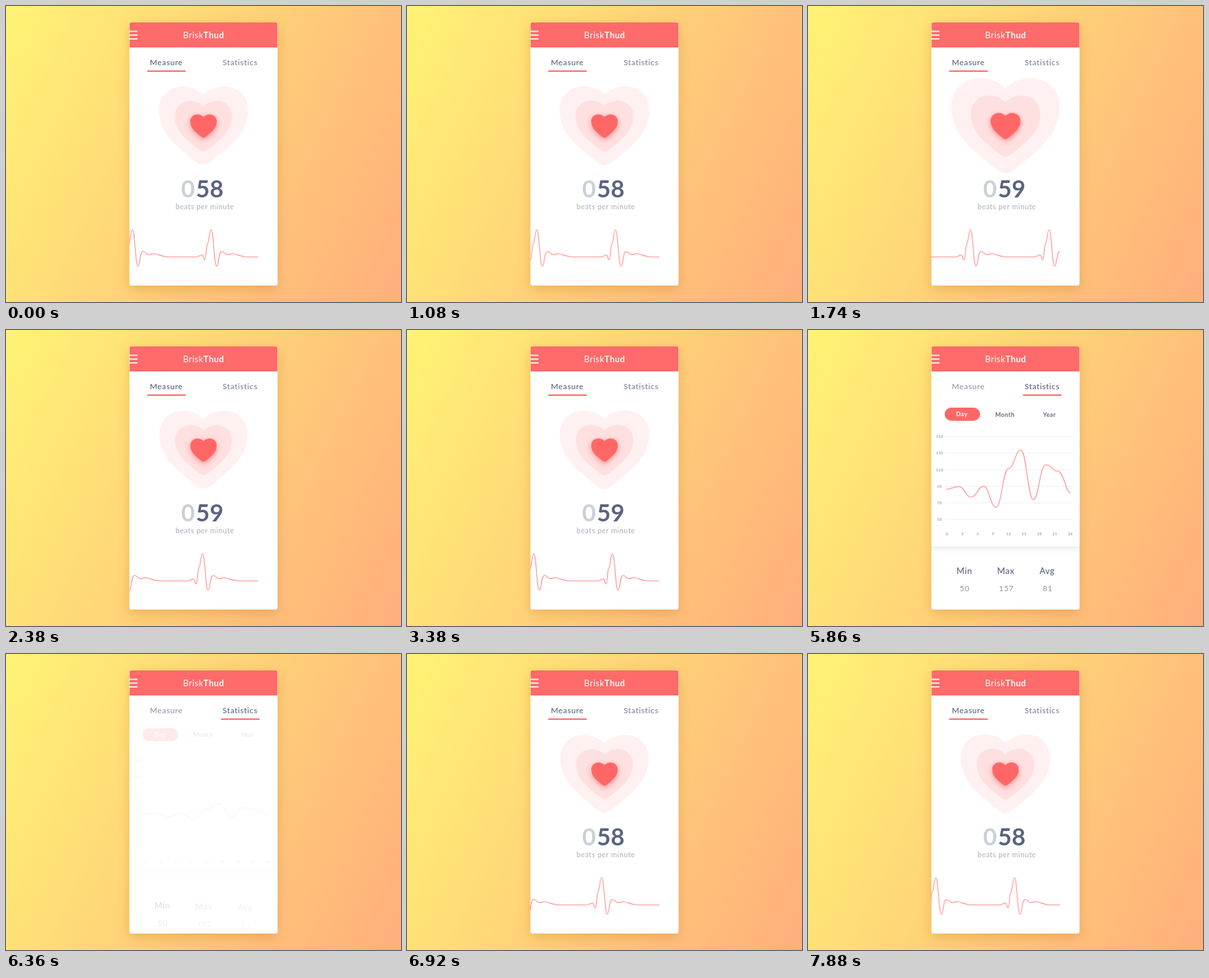
An HTML page for the animation above (7900 ms loop, 600 by 450 pixels).

```html
<!DOCTYPE html>
<html lang="en">
<head>
<meta charset="utf-8">
<title>Pulse monitor</title>
<style>
:root {
  --loop: 7900ms;
  --beat: calc(var(--loop) / 7);
  --out: cubic-bezier(.215, .61, .355, 1);
  --in: cubic-bezier(.645, 0, .785, .39);
  --red: #ff6767;
  --dark: #5a637e;
  --grey: #8d94a5;
}
html, body { margin: 0; width: 100%; height: 100%; overflow: hidden; }
body { background: linear-gradient(115deg, #fff375, #ffae7c); }
svg { display: block; width: 600px; height: 450px; }
text { font-family: Lato, "Open Sans", sans-serif; }

.phone { fill: #fff; filter: drop-shadow(0 6px 9px rgba(190, 110, 30, .3)); }
.title { font-size: 13px; letter-spacing: .5px; fill: #fff; }
.title tspan { font-weight: 700; }
.tab { font-size: 12px; letter-spacing: .6px; font-weight: 500; }
.count { font-size: 36px; font-weight: 700; letter-spacing: .5px; fill: var(--dark); }
.unit { font-size: 11px; letter-spacing: .5px; fill: #a9afbb; }
.range { font-size: 9px; font-weight: 700; letter-spacing: .5px; fill: #5f6880; }
.axis { font-size: 6px; letter-spacing: .2px; fill: #7a8192; text-anchor: middle; }
.name { font-size: 13px; letter-spacing: .5px; font-weight: 500; fill: var(--dark); text-anchor: middle; }
.value { font-size: 12px; letter-spacing: .5px; fill: var(--grey); text-anchor: middle; }
.line { fill: none; stroke: #ff8c8c; stroke-width: 1.15; stroke-linejoin: round; }
.card { fill: #fff; filter: drop-shadow(0 3px 5px rgba(60, 60, 80, .12)); }
.glow { filter: drop-shadow(0 3px 4px rgba(255, 90, 90, .55)); }

.beat { animation: beat var(--beat) calc(230ms - var(--beat)) infinite; }
.scroll { animation: scroll var(--beat) linear infinite; }
.mark, .measure, .stats, .curve, .from, .tab, .old, .new, .min, .max, .avg {
  animation-duration: var(--loop);
  animation-iteration-count: infinite;
  animation-timing-function: linear;
}
.mark { animation-name: mark; }
.measure { animation-name: leave; }
.stats { animation-name: show; }
.from { animation-name: settle; }
.curve { animation-name: grow; }
.tab { animation-name: tint; }
.old { animation-name: old; }
.new { animation-name: new; }
.min { animation-name: min; }
.max { animation-name: max; }
.avg { animation-name: avg; }

@keyframes beat {
  0% { transform: scale(1); animation-timing-function: ease-in-out; }
  26.6% { transform: scale(var(--s)); animation-timing-function: var(--out); }
  100% { transform: scale(1); }
}
@keyframes scroll { to { transform: translateX(-119.5px); } }
@keyframes mark {
  0%, 48.861% { transform: none; animation-timing-function: ease-in-out; }
  55.19%, 81.266% { transform: translateX(112px); animation-timing-function: ease-in-out; }
  87.595%, 100% { transform: none; }
}
@keyframes tint {
  0%, 48.861% { fill: var(--a); }
  55.19%, 81.266% { fill: var(--b); }
  87.595%, 100% { fill: var(--a); }
}
@keyframes leave {
  0%, 48.861% { opacity: 1; }
  52.152%, 84.304% { opacity: 0; }
  87.595%, 100% { opacity: 1; }
}
@keyframes show {
  0%, 51.772% { opacity: 0; animation-timing-function: var(--out); }
  61.392%, 75.063% { opacity: 1; animation-timing-function: var(--in); }
  84.684%, 100% { opacity: 0; }
}
@keyframes settle {
  0%, 51.772% { transform: translateY(var(--dy)); animation-timing-function: var(--out); }
  61.392%, 75.063% { transform: none; animation-timing-function: var(--in); }
  84.684%, 100% { transform: translateY(var(--dy)); }
}
@keyframes grow {
  0%, 50.633% { transform: scaleY(0); animation-timing-function: var(--out); }
  60%, 76.456% { transform: scaleY(1); animation-timing-function: var(--in); }
  85.823%, 100% { transform: scaleY(0); }
}
@keyframes min {
  0%, 51.139% { opacity: 0; transform: translateY(20px); animation-timing-function: var(--out); }
  60.759%, 75.696% { opacity: 1; transform: none; animation-timing-function: var(--in); }
  85.316%, 100% { opacity: 0; transform: translateY(20px); }
}
@keyframes max {
  0%, 52.152% { opacity: 0; transform: translateY(20px); animation-timing-function: var(--out); }
  61.772%, 74.684% { opacity: 1; transform: none; animation-timing-function: var(--in); }
  84.304%, 100% { opacity: 0; transform: translateY(20px); }
}
@keyframes avg {
  0%, 53.038% { opacity: 0; transform: translateY(20px); animation-timing-function: var(--out); }
  62.278%, 74.177% { opacity: 1; transform: none; animation-timing-function: var(--in); }
  83.418%, 100% { opacity: 0; transform: translateY(20px); }
}
/* the reading goes from 58 to 59, and back while hidden */
@keyframes old { 0%, 21% { opacity: 1; } 21.001%, 70% { opacity: 0; } 70.001%, 100% { opacity: 1; } }
@keyframes new { 0%, 21% { opacity: 0; } 21.001%, 70% { opacity: 1; } 70.001%, 100% { opacity: 0; } }
</style>
</head>
<body>
<svg viewBox="0 0 600 450">
  <defs>
    <path id="heart" d="M0-46C-8-55-20-59-31-59C-52-59-67-44-67-24C-67 4-50 22-32 37C-20 47-8 59 0 59C8 59 20 47 32 37C50 22 67 4 67-24C67-44 52-59 31-59C20-59 8-55 0-46Z"/>
    <path id="pulse" d="M-22 381.5C-18 381.5-17 378.5-14 378.5S-12 386-9.5 386C-7.5 386-7.5 364-5.5 362C-3 360-2.5 340 0 340C4 340 4.5 395.5 8.5 395.5C12 395.5 11 373 16.5 373C20 373 21 378 25 378C28 378 29 376.5 33 376.5C40 377 44 381.5 55 381.5H97.6"/>
    <clipPath id="screen"><rect x="187.5" y="25" width="225" height="400" rx="3"/></clipPath>
    <clipPath id="trace"><rect x="187.5" y="330" width="195.5" height="75"/></clipPath>
  </defs>

  <rect class="phone" x="187.5" y="25" width="225" height="400" rx="3"/>
  <g clip-path="url(#screen)">
    <g class="measure">
      <g transform="translate(300 182)">
        <g class="beat" style="--s:1.25">
          <use href="#heart" fill="#fff1f1"/>
          <use href="#heart" fill="#ffe0e0" transform="translate(0 .5) scale(.642)"/>
        </g>
        <g class="glow"><g class="beat" style="--s:1.15">
          <use href="#heart" fill="#ff6767" transform="translate(0 .5) scale(.298)"/>
        </g></g>
      </g>
      <g class="count">
        <text x="266" y="291" fill="#c9d0d8">0</text>
        <text x="288.5" y="291">5</text>
        <text class="old" x="309.5" y="291">8</text>
        <text class="new" x="309.5" y="291">9</text>
      </g>
      <text class="unit" x="257.5" y="309">beats per minute</text>
      <g clip-path="url(#trace)">
        <g class="scroll line">
          <use href="#pulse" x="192"/>
          <use href="#pulse" x="311.5"/>
          <use href="#pulse" x="431"/>
        </g>
      </g>
    </g>

    <g class="stats">
      <rect class="card" x="187.5" y="63" width="225" height="266"/>
      <g class="from" style="--dy:-6px">
        <rect x="207.5" y="118" width="54" height="20" rx="10" fill="#ff6767"/>
        <text class="range" x="225" y="131" style="fill:#fff">Day</text>
        <text class="range" x="284.5" y="131.5">Month</text>
        <text class="range" x="357" y="131.5">Year</text>
      </g>
      <g id="rows"></g>
      <g id="hours" class="from" style="--dy:7px"></g>
      <g transform="translate(0 244.6)"><g class="curve">
        <path class="line" vector-effect="non-scaling-stroke" transform="translate(0 -244.6)"
          d="M210 242C219 242 220 238 229 238S239 254 247.8 254S258 237.5 266.7 237.5S277 269.5 285.6 269.5S296 210.5 304.5 210.5S315 182.5 323.4 182.5S334 258 342.3 258S352 205 361.2 205S372 215 380.1 215S392 248 399 248"/>
      </g></g>
    </g>

    <g class="min"><text class="name" x="237.5" y="371">Min</text><text class="value" x="238" y="397">50</text></g>
    <g class="max"><text class="name" x="300.5" y="371">Max</text><text class="value" x="301.2" y="397">157</text></g>
    <g class="avg"><text class="name" x="363.3" y="371">Avg</text><text class="value" x="364" y="397">81</text></g>

    <rect x="187.5" y="25" width="225" height="38" fill="#ff6a6a"/>
    <path d="M187 38.5H199M187 44.3H199M187 50.1H199" stroke="#fff" stroke-opacity=".9" stroke-width="2" stroke-linecap="round"/>
    <text class="title" x="300.2" y="49" text-anchor="middle">Brisk<tspan>Thud</tspan></text>
    <text class="tab" x="218.5" y="90.3" style="--a:#5a637e;--b:#9299a8">Measure</text>
    <text class="tab" x="329" y="90.3" style="--a:#7d8497;--b:#5a637e">Statistics</text>
    <rect class="mark" x="214.5" y="98" width="58.5" height="2" fill="#ff6767"/>
  </g>
</svg>
<script>
const add = (parent, tag, attrs, text = "") => {
  const el = document.createElementNS("http://www.w3.org/2000/svg", tag);
  for (const key in attrs) el.setAttribute(key, attrs[key]);
  el.textContent = text;
  parent.append(el);
};
const rows = document.getElementById("rows");
const hours = document.getElementById("hours");

for (let i = 0; i < 6; i++) {
  const y = 162 + 25.2 * i;
  add(rows, "path", { d: `M208 ${y}H403`, stroke: "#efeff1" });
  add(rows, "text", { class: "axis", x: 199.8, y: y + 2.1 }, 150 - 20 * i);
}
for (let i = 0; i < 9; i++) {
  add(hours, "text", { class: "axis", x: 211.2 + 23.4 * i, y: 311.6 }, 3 * i);
}
</script>
</body>
</html>
```
